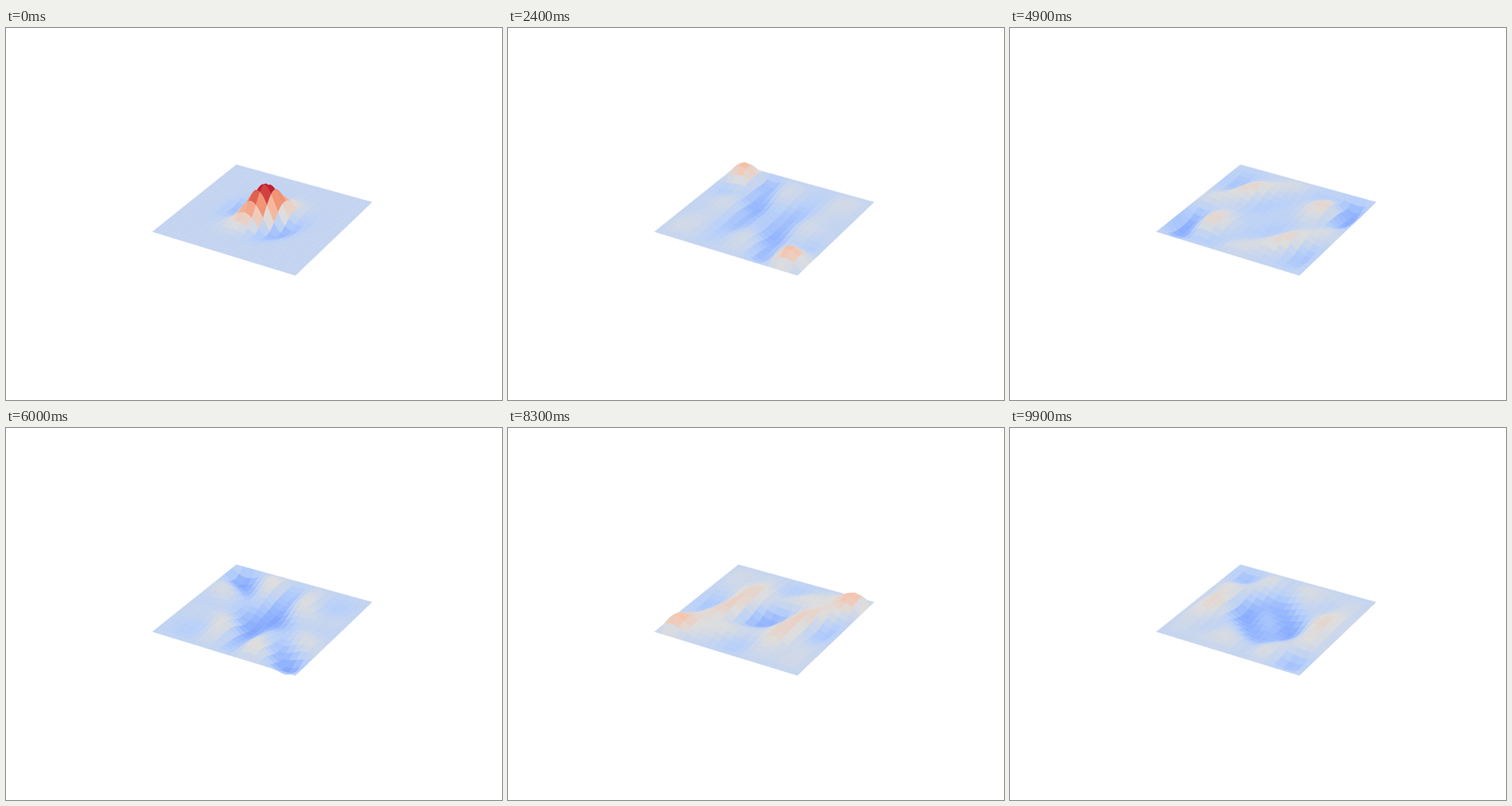
Animation, 640 px wide and 480 px high, one loop 10 s. Source, as an HTML page with a canvas:

```html
<!DOCTYPE html>
<html lang="en">
<head>
<meta charset="utf-8">
<title>Wave in a square basin</title>
<style>
  html, body { margin: 0; width: 100%; height: 100%; overflow: hidden; background: #fff; }
  canvas { display: block; width: 640px; height: 480px; }
</style>
</head>
<body>
<canvas id="stage" width="640" height="480"></canvas>
<script>
const ctx = document.getElementById('stage').getContext('2d');

const FRAMES = 100, FRAME_MS = 100;
const N = 101, STRIDE = 5;            // grid nodes per side, nodes per patch
const STEPS = 5, COURANT = 0.7;       // solver steps per frame

// Cool-to-warm diverging palette, evenly spaced stops
const PALETTE = [
  [59, 76, 192], [98, 130, 234], [141, 176, 254], [184, 208, 249], [221, 221, 221],
  [245, 196, 173], [244, 154, 123], [222, 96, 77], [180, 4, 38]
];
const ZERO_TONE = 0.415, TONE_GAIN = 0.62;

function tone(z) {
  const t = Math.min(1, Math.max(0, ZERO_TONE + TONE_GAIN * z)) * (PALETTE.length - 1);
  const i = Math.min(PALETTE.length - 2, Math.floor(t));
  const mix = PALETTE[i].map((c, k) => Math.round(c + (PALETTE[i + 1][k] - c) * (t - i)));
  return `rgb(${mix})`;
}

// Gaussian wave packet, at rest, on [-3, 3] x [-3, 3]
function packet() {
  const u = new Float32Array(N * N);
  for (let j = 1; j < N - 1; j++) {
    for (let i = 1; i < N - 1; i++) {
      const x = 6 * i / (N - 1) - 3, y = 6 * j / (N - 1) - 3;
      u[j * N + i] = Math.exp(-x * x - y * y) * Math.cos(2 * x - y);
    }
  }
  return u;
}

// One leapfrog step of the wave equation with fixed edges
function advance(prev, cur, gain) {
  const next = new Float32Array(N * N);
  for (let j = 1; j < N - 1; j++) {
    for (let i = 1; i < N - 1; i++) {
      const k = j * N + i;
      const lap = cur[k - 1] + cur[k + 1] + cur[k - N] + cur[k + N] - 4 * cur[k];
      next[k] = 2 * cur[k] - prev[k] + gain * lap;
    }
  }
  return next;
}

function simulate() {
  const gain = COURANT * COURANT;
  let cur = packet();
  // Mirrored past state gives zero starting velocity
  let prev = advance(cur, cur, gain / 2);
  const frames = [cur];
  while (frames.length < FRAMES) {
    for (let s = 0; s < STEPS; s++) {
      const next = advance(prev, cur, gain);
      prev = cur;
      cur = next;
    }
    frames.push(cur);
  }
  return frames;
}

// Perspective camera: azimuth -60, elevation 30, distance 10
const HALF = 0.5195, BASE = -0.035, LIFT = 0.2375;
const SCALE = 1997.8, CX = 333, CY = 237.4;
const SIN60 = Math.sqrt(3) / 2;

function project(i, j, z) {
  const x = (2 * i / (N - 1) - 1) * HALF;
  const y = (2 * j / (N - 1) - 1) * HALF;
  const h = BASE + LIFT * z;
  const right = SIN60 * x + 0.5 * y;
  const up = -0.25 * x + SIN60 / 2 * y + SIN60 * h;
  const depth = 10 - (SIN60 / 2 * x - 0.75 * y + 0.5 * h);
  return [CX + SCALE * right / depth, CY - SCALE * up / depth];
}

// Walk round a patch's rim, so its edges follow the fine grid
const RIM = [];
for (let s = 0; s < STRIDE; s++) RIM.push([s, 0]);
for (let s = 0; s < STRIDE; s++) RIM.push([STRIDE, s]);
for (let s = STRIDE; s > 0; s--) RIM.push([s, STRIDE]);
for (let s = STRIDE; s > 0; s--) RIM.push([0, s]);

function drawPatch(u, i0, j0) {
  let sum = 0;
  ctx.beginPath();
  for (const [di, dj] of RIM) {
    const z = u[(j0 + dj) * N + i0 + di];
    sum += z;
    ctx.lineTo(...project(i0 + di, j0 + dj, z));
  }
  ctx.closePath();
  ctx.fillStyle = ctx.strokeStyle = tone(sum / RIM.length);
  ctx.fill();
  ctx.stroke();   // closes the seams between patches
}

function draw(u) {
  ctx.fillStyle = '#fff';
  ctx.fillRect(0, 0, 640, 480);
  ctx.lineWidth = 0.6;
  ctx.lineJoin = 'round';
  // Back to front
  for (let j = N - 1 - STRIDE; j >= 0; j -= STRIDE) {
    for (let i = 0; i < N - 1; i += STRIDE) drawPatch(u, i, j);
  }
}

const frames = simulate();
const start = performance.now();
let shown = -1;

function tick() {
  const n = Math.floor((performance.now() - start) / FRAME_MS) % FRAMES;
  if (n !== shown) draw(frames[shown = n]);
  requestAnimationFrame(tick);
}
tick();
</script>
</body>
</html>
```
